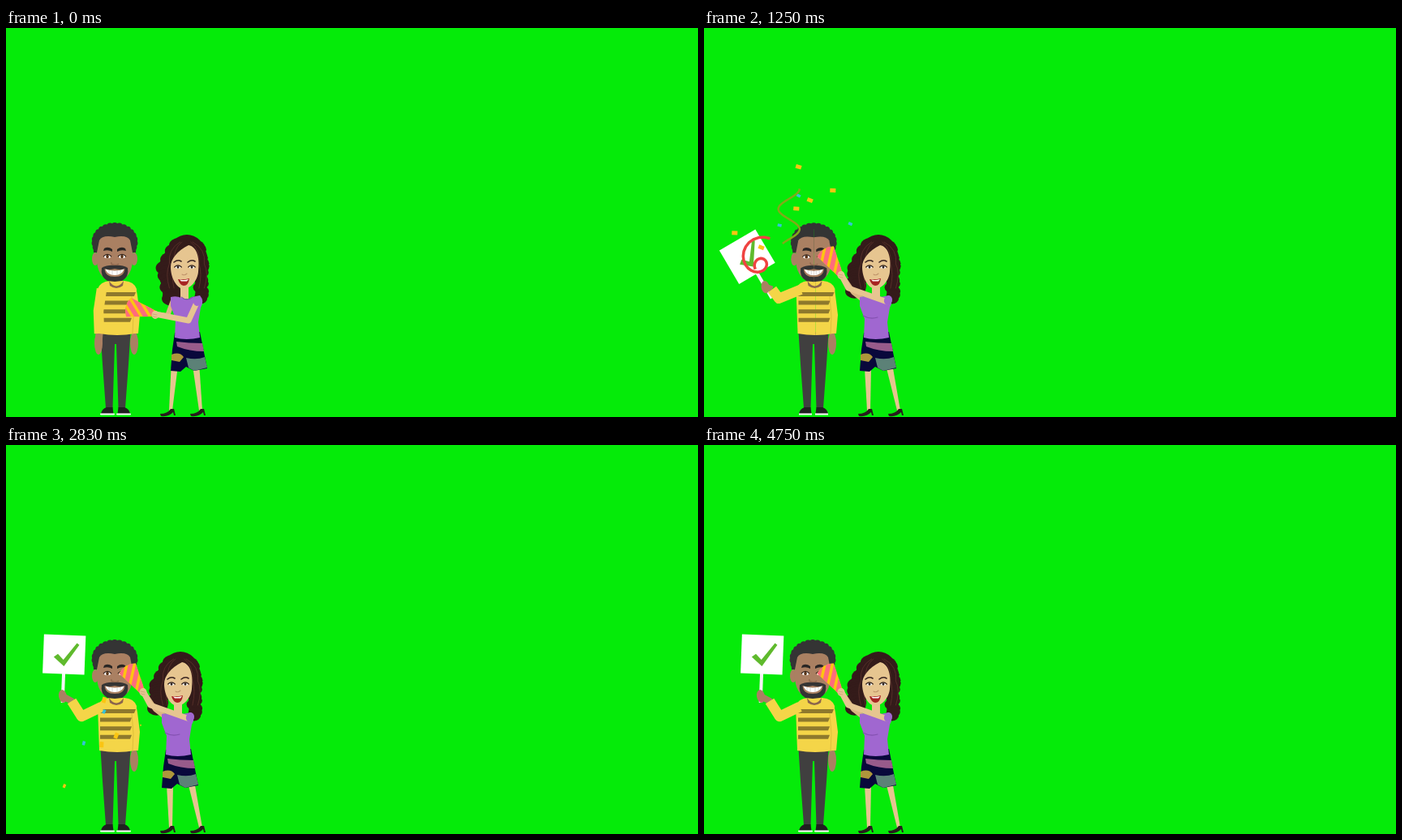
An HTML page with a canvas that plays this animation: 853 by 480 pixels, repeating every 4.83 s.

```html
<!DOCTYPE html>
<html lang="en">
<head>
<meta charset="utf-8">
<title>Celebration</title>
<style>
html, body { margin: 0; width: 100%; height: 100%; overflow: hidden; background: #05eb09; }
canvas { display: block; }
</style>
</head>
<body>
<canvas id="stage" width="853" height="480"></canvas>
<script>
const ctx = document.getElementById('stage').getContext('2d');
const LOOP = 4830, STEPS = 58, TICK = LOOP / STEPS, POP = 0.94;
const GREEN = '#05eb09', DARK = '#343434', SKIN = '#aa8062', SHADE = '#8b654c';
const YELLOW = '#f4d548', STRIPE = '#8e792c', PALE = '#e6c590', HAIR = '#341b1a';
const PURPLE = '#a067d0', NAVY = '#09083b', PINK = '#ff6b7c', GOLD = '#fbc512', BLUE = '#35c3d8';

const mix = (a, b, k) => Array.isArray(a) ? a.map((v, i) => mix(v, b[i], k)) : a + (b - a) * k;
const clamp = k => Math.min(1, Math.max(0, k));
const ramp = (t, a, b) => { const k = clamp((t - a) / (b - a)); return k * k * (3 - 2 * k); };
const noise = n => Math.abs(Math.sin(n * 127.1 + 3) * 4375.85) % 1;

function path(d, fill, stroke, width = 1) {
  const p = new Path2D(d);
  if (fill) { ctx.fillStyle = fill; ctx.fill(p); }
  if (stroke) { ctx.strokeStyle = stroke; ctx.lineWidth = width; ctx.stroke(p); }
}
const limb = (pts, color, width) => path('M' + pts.join('L'), null, color, width);
const box = (x, y, w, h, fill) => path(`M${x} ${y}h${w}v${h}h${-w}Z`, fill);
function oval(x, y, rx, ry, fill, turn = 0) {
  ctx.beginPath();
  ctx.ellipse(x, y, rx, ry, turn, 0, 7);
  ctx.fillStyle = fill;
  ctx.fill();
}
function at(x, y, turn, draw) {
  ctx.save();
  ctx.translate(x, y);
  ctx.rotate(turn);
  draw();
  ctx.restore();
}
function mirror(x, draw) {
  for (const side of [-1, 1]) at(x, 0, 0, () => { ctx.scale(side, 1); draw(); });
}
function eye(x, y, size, iris) {
  oval(x, y, size, size * 0.55, '#fff');
  oval(x, y, size * 0.45, size * 0.55, iris);
  path(`M${x - size - 1} ${y}q${size + 1} ${-size - 1} ${2 * size + 2} 0`, null, '#33241d', 1.2);
}

function sign(t, hand) {
  const up = ramp(t, POP, 1.4), settle = ramp(t, 1.58, 2);
  if (t < 0.7) return;
  if (t < 0.98) {
    const slide = 14 * (1 - ramp(t, 0.7, 0.9));
    path('M80 368L116 342L121 357L95 377Z', '#fff');
    if (slide) path('M80 368L95 377', null, '#fff', 1);
    return;
  }
  at(hand[0], hand[1], mix(mix(-1.9, -0.07, up), 0.038, settle), () => {
    ctx.translate(0, mix(8, 0, settle));
    box(-2, -30, 4, 38, '#f4f4f4');
    box(-26, -75.5, 51.5, 48, '#fff');
    path('M-13 -48L-8 -52L-1 -45L15 -66L18 -64L0 -37Z', '#5fba2d');
  });
}

function manHead() {
  for (let i = 0; i <= 16; i++) {
    const a = Math.PI * (0.9 + i * 1.2 / 16);
    oval(134 + 24.5 * Math.cos(a), 264 + 20 * Math.sin(a), 4, 4, DARK);
  }
  mirror(134, () => {
    oval(24, 285, 4, 8, SKIN);
    path('M0 243Q24 243 27 263L26 277H0Z', DARK);
    path('M0 258Q15 255 19 262L22 277Q24 304 9 311H0Z', SKIN);
    path('M0 293Q9 292 16 296Q18 307 9 312L0 313Z', DARK);
    path('M0 297Q8 299 12.5 297Q12 307 0 307Z', SKIN);
    path('M0 299.5Q7 299.5 11.5 297.5Q9 305 0 305Z', '#fff');
    path('M3 299V304M7 299V303', null, '#bbb', 0.6);
    path('M3 273Q8 269 13 272L14 275Q8 273 3 276Z', '#292624');
    eye(9, 282, 4, '#5a3518');
  });
  path('M130 289q-1 3 3 3q3 1 6 -1', null, SHADE, 1.3);
}

function man(t) {
  const out = ramp(t, 0.2, 0.85), up = ramp(t, POP, 1.4), lean = out * (1 - up);
  const pose = (a, b, c) => mix(mix(a, b, out), c, up);
  const arm = pose([[118, 322], [114, 349], [115, 377]],
                   [[123, 322], [90, 330], [93, 342]],
                   [[118, 323], [93, 335], [81, 316]]);
  const hand = pose([114, 389], [92, 348], [70, 310]);

  sign(t, hand);
  box(127, 305, 17, 16, SHADE);
  mirror(135, () => {
    path('M0 375H18.5L16 415L12 469H3.5L1 390H0Z', '#403f3f');
    path('M2.5 476L3.5 468H11Q17 470 18 476Z', '#202020');
    path('M2 476.5H18', null, '#fff', 2);
  });
  oval(158, 389, 5, 14, SKIN);
  path('M150 314Q160 315 162 330L165 354L163 377H152Z', YELLOW);

  limb([arm[2], hand], SKIN, mix(9, 8, up));
  oval(hand[0], hand[1], 5, pose(14, 7, 8), SKIN, -0.2 * up);
  at(lean * 2, 0, 0, () => {
    mirror(137, () => path('M0 312H9Q21 313 24 322L22 377Q11 379 0 379Z', YELLOW));
    for (let i = 0; i < 4; i++) {
      const wide = i ? 0 : 5;
      path(`M${116 - wide} ${326 + i * 10.6}H${155 + wide}l-2 5H${116 - wide / 2}Z`, STRIPE);
    }
    path('M127 312Q136 325 145 312L144 318Q136 324 128 318Z', SHADE);
  });
  ctx.lineCap = 'butt';
  limb(arm, YELLOW, 12.5);
  path('M155 331L157 356L156 377', null, '#d9b936', 0.8);
  at(lean * 5, lean * 1.2, 0, manHead);
}

// Wavy lock of hair: overlapping round curls along a line.
function lock(from, to, r) {
  for (let i = 0; i <= 8; i++) {
    const [x, y] = mix(from, to, i / 8);
    oval(x + 1.5 * Math.sin(i * 2.2), y, r, r * 0.75, HAIR);
  }
}
function womanHead(k) {
  const low = mix([197, 334], [187, 325], k);
  oval(215, 277, 22, 22, HAIR);
  lock([205, 268], [190, 296], 12);
  lock([190, 296], low, 11.5);
  lock([226, 270], [232, 297], 11);
  lock([232, 297], [233, 334], 8.5);
  for (const x of [-22, -16, 17, 24]) {
    path(`M${214 + x / 3} 264q${x * 0.7} 9 ${x * 0.6} 27q${x / 4} 12 0 30`, null, '#57302a', 0.9);
  }
  box(207, 314, 10, 20, PALE);
  path('M217 268C228 270 231 285 229 301C228 312 219 322 211 322C202 321 195 308 195 295C195 285 203 275 217 268Z', PALE);
  for (const x of [204, 221]) {
    eye(x, 295, 3.3, '#30241e');
    path(`M${x - 5} 289q5 -4 9 -1`, null, '#392420', 1.6);
  }
  path('M209 304q3 2 6 -1', null, '#c1966c', 1.1);
  path('M204 310Q211 311 218 309Q217 318 211 318Q206 317 204 310Z', '#a72322');
  path('M206 310.5Q211 311.5 217 310L215 312.5H208Z', '#fff');
}

function cone(x, y, turn, len, half) {
  at(x, y, turn, () => {
    ctx.clip(new Path2D(`M0 -3L${len - 2} ${-half}Q${len + 5} 0 ${len - 2} ${half}L0 3Z`));
    box(-2, -20, 60, 40, GOLD);
    for (let s = -24; s < 60; s += 13) path(`M${s - 18} -18h8l36 36h-8Z`, PINK);
  });
}

function outfit() {
  path('M197 376L228 375L237 420L221 423L211 418L204 424L192 423L194 397Z', NAVY);
  path('M199 387Q214 389 231 389L233 399Q215 399 200 393Z', '#985b8b');
  path('M193 403Q203 399 208 406L203 412L193 410Z', '#ae963b');
  path('M211 407Q224 410 234 406L237 419L221 423L214 419Z', '#5c8177');
  path('M192 332Q199 330 205 333Q212 337 218 332L228 330Q234 337 229 345L226 363L228 382Q211 386 197 382L198 359L192 343Z', PURPLE);
  path('M196 355q9 5 18 2M205 332q7 6 14 0', null, '#8250b0', 1.1);
}

function woman(t) {
  const k = ramp(t, 0.12, 0.83), hip = 11 * (1 - k);
  const shoulder = mix([235, 339], [226, 338], k), hand = mix([184, 353], [169, 304], k);
  const near = [shoulder, mix([225, 361], [178, 321], k), hand];
  const far = [[shoulder[0] - 29, 336], mix([199, 355], [184, 326], k), hand];

  for (const [x, foot] of [[198, 202], [225, 239]]) {
    const top = x + hip * 0.5;
    path(`M${top} 420h8L${foot + 3} 472h-4Z`, PALE);
    path(`M${foot - 12} 476q9 0 13 -6h4l2 8h-2l-1 -4q-5 6 -15 5Z`, '#281c1c');
  }
  ctx.lineCap = 'round';
  at(8 * (1 - k), 0, 0, () => womanHead(k));
  limb(far, '#dab681', 6);
  at(hip, 0, 0, outfit);

  const squeeze = ramp(t, 0.6, 0.9) * (1 - ramp(t, POP, 1.15));
  cone(mix(186, 169, k), mix(353, 306, k), mix(3.38, 4.145, k), 38 - 10 * squeeze, 12 + 3 * squeeze);

  limb(near, PALE, 7);
  oval(hand[0], hand[1] + 1, 4.5, 5, PALE);
  path(`M${hand[0] - 3} ${hand[1]}l5 1m-5 2l5 1`, null, '#c79b70', 0.7);
  oval(shoulder[0] + 1, shoulder[1] - 2, 5, 6, PURPLE, 0.3);
}

function ribbon(color, width, point) {
  const pts = Array.from({ length: 33 }, (_, i) => point(i / 32));
  limb(pts, color, width);
}

// Places the paper bits drift through once the burst is over.
const BITS = [[116, 231], [32, 318], [67, 337], [131, 275], [113, 286], [161, 262], [116, 264], [91, 303], [184, 301]];
const MUZZLE = [146, 274];

function confetti(t) {
  if (t <= POP) return;
  const d = t - 1.582, early = Math.min(0, d), rise = 400 * early * early;
  const burst = 1 - Math.exp(-9 * (t - POP));
  const fly = (x, y) => mix(MUZZLE, [x, y - rise], burst);

  BITS.forEach(([x, y], i) => {
    const blue = i > 5, end = 3.6 - Math.abs(x - 110) / 75;
    const size = clamp((end - t) / 0.3) * (blue ? 5 : 7);
    const [px, py] = fly(x + 4 * d, y + (blue ? 52 : 67) * d);
    at(px, py, 0.3 + noise(i) * 0.6 + d, () => box(-size / 2, -size / 3, size, size * 0.7, blue ? BLUE : GOLD));
  });

  if (t > 2.4) return;
  const k = clamp(d / 0.5), drop = 70 * (d - 0.5 * k);
  ctx.lineCap = 'butt';
  ribbon('#ef4341', 3.5, u => {
    const a = mix(-1, -0.3, k) + u * mix(-9, 1.8, k);
    const r = mix(5 + 23 * (1 - u) ** 1.6, 20, k);
    return fly(mix(62, 50, k) + r * Math.cos(a), mix(350 + 14 * u, 400, k) + r * Math.sin(a) + drop);
  });
  ribbon('#83aa18', 2.5, u =>
    fly(mix(102 + 14 * Math.cos(8.5 * u), 107 - 14 * u, k), mix(261 + 72 * u, 370 + 9 * u, k) + drop));
}

const start = performance.now();
function draw() {
  const ms = (performance.now() - start) % LOOP;
  const t = Math.floor(ms / TICK + 0.1) % STEPS * TICK / 1000;
  box(0, 0, 853, 480, GREEN);
  ctx.lineJoin = 'round';
  man(t);
  woman(t);
  confetti(t);
  requestAnimationFrame(draw);
}
draw();
</script>
</body>
</html>
```
